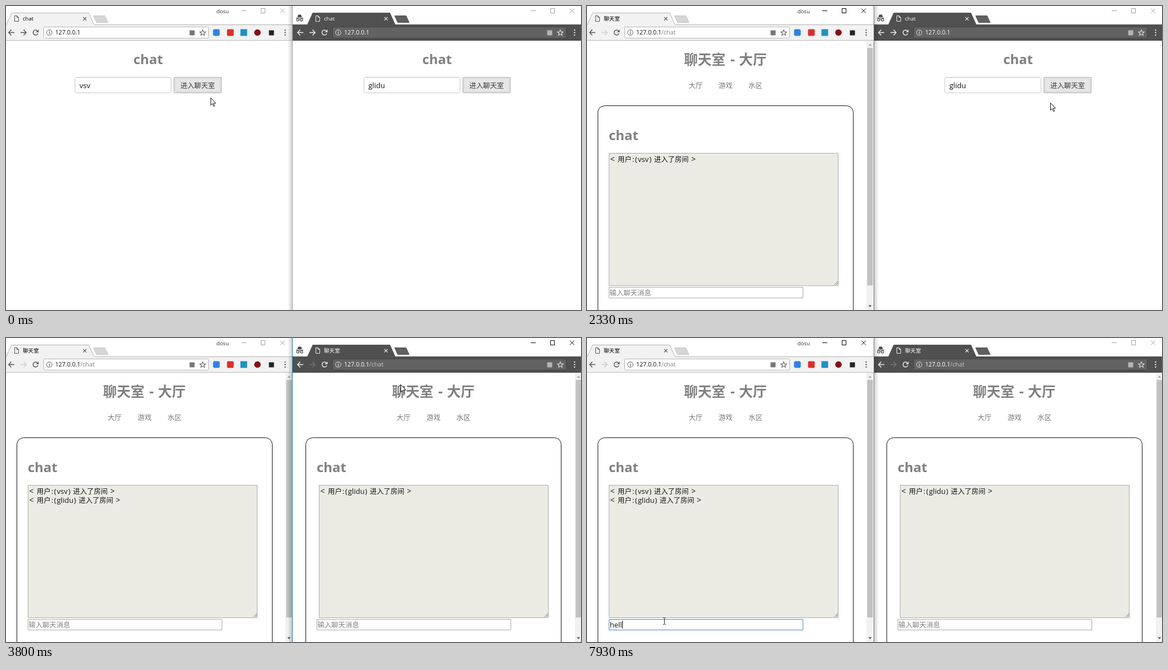
These frames come from a looping animation (1029 px wide and 544 px high, 8 s). An HTML page with a canvas:

```html
<!DOCTYPE html>
<html lang="zh">
<head>
<meta charset="utf-8">
<title>chat</title>
<style>
html, body { margin: 0; width: 100%; height: 100%; overflow: hidden; background: #fff; }
canvas { display: block; }
</style>
</head>
<body>
<canvas id="stage" width="1029" height="544"></canvas>
<script>
const g = document.getElementById('stage').getContext('2d');
const FONT = '"Open Sans", "Noto Sans CJK SC", "Noto Sans CJK", sans-serif';
const LOOP = 8000, SHIFT = 517;
const LEFT_USER = 'vsv', RIGHT_USER = 'glidu';

// Pointer hot spot: time, x, y
const POINTER = [
  [0, 366, 164], [400, 366, 163], [1000, 362, 146], [1200, 359, 141], [1330, 321, 140],
  [1400, 347, 136], [1600, 347, 136], [1900, 560, 158], [2200, 861, 172], [2330, 829, 173],
  [2400, 832, 170], [2600, 848, 152], [2730, 893, 142], [2870, 873, 144], [3530, 873, 144],
  [3700, 800, 98], [3850, 660, 75], [4000, 480, 130], [4200, 230, 360], [4330, 136, 491],
  [4400, 136, 481], [4600, 139, 508], [4800, 139, 508], [4930, 138, 506]
];
// Typing: time, text
const TYPED = [[5870, 'h'], [6070, 'he'], [6470, 'hel'], [6670, 'helo'], [7600, 'hel'], [7930, 'hell']];

const ARROW = new Path2D('M.5 .5V13.5L3.5 10.7L5.7 15.6L7.6 14.8L5.4 10H9.4Z');
const HAND = new Path2D('M-1.5 1.2Q0 -.8 1.5 1.2V6Q3.5 5.2 4.2 6.8Q6 6 6.6 7.6Q9 7.2 9 9.5V13Q8.6 15.5 7.5 17.5H.5Q-1 14.5 -3.8 11.5Q-4.3 9 -1.5 10.5Z');

function rect(x, y, w, h, fill) { g.fillStyle = fill; g.fillRect(x, y, w, h); }

function box(x, y, w, h, r, fill, stroke) {
  g.beginPath();
  g.roundRect(x + .5, y + .5, w - 1, h - 1, r);
  if (fill) { g.fillStyle = fill; g.fill(); }
  if (stroke) { g.strokeStyle = stroke; g.lineWidth = 1; g.stroke(); }
}

function text(s, x, y, size, color, weight = 400) {
  g.font = `${weight} ${size}px ${FONT}`;
  g.fillStyle = color;
  g.fillText(s, x, y);
}

function line(color, width, ...pts) {
  g.beginPath();
  for (let i = 0; i < pts.length; i += 2) g.lineTo(pts[i], pts[i + 1]);
  g.strokeStyle = color; g.lineWidth = width; g.stroke();
}

function poly(fill, stroke, ...pts) {
  g.beginPath();
  for (let i = 0; i < pts.length; i += 2) g.lineTo(pts[i], pts[i + 1]);
  g.closePath();
  g.fillStyle = fill; g.fill();
  if (stroke) { g.strokeStyle = stroke; g.lineWidth = 1; g.stroke(); }
}

function ring(x, y, r, color, width = 1, from = 0, to = 7) {
  g.beginPath(); g.arc(x, y, r, from, to);
  g.strokeStyle = color; g.lineWidth = width; g.stroke();
}

function dot(x, y, r, color) {
  g.beginPath(); g.arc(x, y, r, 0, 7); g.fillStyle = color; g.fill();
}

function cross(x, y, r, color, width) {
  line(color, width, x - r, y - r, x + r, y + r);
  line(color, width, x - r, y + r, x + r, y - r);
}

function star(x, y, color) {
  g.beginPath();
  for (let i = 0; i < 10; i++) {
    const a = i * Math.PI / 5 - Math.PI / 2, r = i % 2 ? 2.4 : 5.4;
    g.lineTo(x + r * Math.cos(a), y + r * Math.sin(a));
  }
  g.closePath(); g.strokeStyle = color; g.lineWidth = 1.1; g.stroke();
}

function navArrow(x, dir, color) {
  line(color, 1.6, x - 5 * dir, 47.5, x + 5 * dir, 47.5);
  line(color, 1.6, x + .5 * dir, 42.5, x + 5.2 * dir, 47.5, x + .5 * dir, 52.5);
}

function reload(x, color) {
  ring(x, 47.5, 4.4, color, 1.6, .4, 5.4);
  poly(color, null, x + 5.4, 42, x + 5.4, 47, x + .5, 47);
}

function tab(x, title, dark, loading) {
  const bg = dark ? '#505050' : '#f2f2f2', ink = dark ? '#eee' : '#555';
  poly(bg, dark ? '#505050' : '#b0b0b0', x + .5, 33.5, x + 10, 12.5, x + 148, 12.5, x + 157.5, 33.5);
  poly(dark ? '#606060' : '#d6d6d6', dark ? '#555' : '#c4c4c4',
    x + 156.5, 17.5, x + 177, 17.5, x + 182.5, 29.5, x + 162, 29.5);
  if (loading) dot(x + 20, 18, .9, ink);
  else {
    line(ink, 1, x + 15.5, 18, x + 15.5, 27.5, x + 22.5, 27.5, x + 22.5, 20.5, x + 19.5, 17.5, x + 15, 17.5);
    line(ink, 1, x + 19.5, 17.5, x + 19.5, 20.5, x + 22.5, 20.5);
  }
  text(title, x + 30, 26, 9.6, dark ? '#fff' : '#000');
  cross(x + 141, 22.7, 2.9, ink, 1.2);
}

function browser({ dark, page, active, loading }) {
  const ink = dark ? '#e6e6e6' : '#5a5a5a', bar = dark ? '#505050' : '#f2f2f2';
  const w = dark ? 512 : 513, off = dark ? 1 : 0, x0 = dark ? -4 : 0;
  rect(x0, 0, w + 4, 544, '#fff');
  rect(x0, 33, w + 4, 29, bar);
  rect(x0, 33, w + 4, 1, dark ? '#505050' : '#b0b0b0');
  rect(x0, 61, w + 4, 1, dark ? '#3c3c3c' : '#b8b8b8');
  tab(dark ? 22 : 0, loading ? '127.0.0.1/chat' : page ? '聊天室' : 'chat', dark, loading);
  if (!dark) rect(1, 33, 157, 1, bar);

  const btn = active ? '#000' : '#a0a0a0';
  line(btn, 1, 421 + off, 8.5, 430 + off, 8.5);
  box(456 + off, 4, 8, 9, 0, null, btn);
  cross(495 + off, 8.5, 4, btn, 1);

  navArrow(10, -1, ink);
  navArrow(31, 1, page ? (dark ? '#737373' : '#d0d0d0') : ink);
  if (loading) cross(53, 47.5, 4.2, ink, 1.5); else reload(53, ink);

  box(67, 37, dark ? 419 : 296, 21, 2, dark ? '#626262' : '#fff', dark ? '#444' : '#b4b4b4');
  ring(77.5, 47.5, 4.8, ink);
  rect(77, 46.5, 1.2, 4, ink); rect(77, 44.3, 1.2, 1.2, ink);
  text('127.0.0.1', 88, 51.3, 10.7, dark ? '#fff' : '#111');
  if (page) text('/chat', 133, 51.3, 10.8, dark ? '#c4c4c4' : '#808080');
  if (!loading) box(dark ? 451 : 328, 43, 10, 10, 1, dark ? '#b5b5b5' : '#777');
  star(dark ? 475 : 352, 48, ink);
  for (const y of [43, 47.5, 52]) dot(499.5 + off, y, 1.2, ink);

  if (dark) {
    rect(2, 21, 13, 1.3, '#444');
    poly('#444', null, 4.5, 20, 6, 15.5, 11, 15.5, 12.5, 20);
    ring(5, 25, 2, '#444', 1.2); ring(12, 25, 2, '#444', 1.2);
    line('#444', 1, 7, 24.5, 10, 24.5);
  } else {
    text('dosu', 376.5, 13, 9.7, '#333');
    box(370, 41, 13, 13, 3, '#2f82e0');
    box(395, 41, 13, 13, 2, '#d9302c');
    box(419, 41, 13, 13, 0, '#1f91c2');
    dot(450, 47.5, 5.8, '#850f16');
    box(470, 43, 10, 10, 0, '#222');
  }
}

function login(user, hover) {
  text('chat', 228, 104, 24, '#808080', 700);
  box(123, 127, 173, 29, 3, '#fff', '#c6c6c6');
  line('#eee', 1, 126, 128.5, 293, 128.5);
  text(user, 131.5, 146.6, 13, '#111');
  box(300, 127, 86, 29, 1, '#e6e6e6');
  if (hover) {
    const shade = g.createLinearGradient(0, 127, 0, 156);
    shade.addColorStop(0, 'rgba(0,0,0,0)');
    shade.addColorStop(.4, 'rgba(0,0,0,.05)');
    shade.addColorStop(1, 'rgba(0,0,0,.11)');
    box(300, 127, 86, 29, 1, shade);
  }
  [.24, .06, .035, .015].forEach((a, i) =>
    box(300 + i, 127 + i, 86 - 2 * i, 29 - 2 * i, 1, null, `rgba(0,0,0,${a})`));
  text('进入聊天室', 312, 146.6, 12.4, '#3a3a3a');
}

function message(user, x, y, gap) {
  const ink = '#111';
  text('<', x, y, 14, ink);
  text('用户', x + 13.5, y, 12.4, ink);
  text(':', x + 39.5, y, 13, ink);
  text('(', x + 44.5, y, 13, ink);
  text(user, x + 49.5, y, 13, ink);
  text(')', x + 50 + gap, y, 13, ink);
  text('进入了房间', x + 58.5 + gap, y, 12.4, ink);
  text('>', x + 125 + gap, y, 14, ink);
}

function room({ dark, loading, users, typed, focus, caret }) {
  if (loading) text('聊天室', 211, 105, 24.8, '#808080', 700);
  else {
    text('聊天室', 173.5, 105, 24.8, '#808080', 700);
    text('-', 256.5, 104, 25, '#808080', 700);
    text('大厅', 272, 105, 24.8, '#808080', 700);
  }
  ['大厅', '游戏', '水区'].forEach((s, i) => text(s, 182 + 53.5 * i, 146.7, 12.5, '#777'));
  box(19, 178, 458, 400, 12, '#fff', '#111');
  text('chat', 39, 240, 24, '#808080', 700);

  const ax = dark ? 43 : 39;
  box(ax, 263, 411, 238, 0, '#ebebe4', '#a9a9a9');
  line('#777', 1, ax + 404, 499, ax + 410, 493);
  line('#777', 1, ax + 407, 499, ax + 410, 496);
  users.forEach(([name, gap], i) => message(name, ax + 2.5, 279 + 16.3 * i, gap));

  box(39, 503, 348, 20, 0, '#fff', focus ? '#4a86cf' : '#a9a9a9');
  if (typed) text(typed, 40.8, 517.6, 13, '#111');
  else text('输入聊天消息', 40.5, 518, 12.4, '#808080');
  if (caret) {
    g.font = `400 13px ${FONT}`;
    rect(Math.round(41 + g.measureText(typed).width), 506, 1, 14, '#000');
  }

  const sx = dark ? 501 : 500;
  rect(sx, 62, 13, 482, '#f1f1f1');
  rect(sx + 1.5, 75, 10, 425, '#c1c1c1');
  poly('#a3a3a3', null, sx + 3.5, 71, sx + 9.5, 71, sx + 6.5, 67.5);
  poly('#505050', null, sx + 3.5, 535.5, sx + 9.5, 535.5, sx + 6.5, 539);
}

function pointerAt(t) {
  const i = POINTER.findIndex(k => k[0] > t);
  if (i < 0) return POINTER.at(-1).slice(1);
  const [a, ax, ay] = POINTER[i - 1], [b, bx, by] = POINTER[i], p = (t - a) / (b - a);
  return [Math.round(ax + (bx - ax) * p), Math.round(ay + (by - ay) * p)];
}

const inside = (x, y, l, t, r, b) => x >= l && x < r && y >= t && y < b;

function drawPointer(x, y, kind) {
  if (kind === 'beam') {
    line('#222', 1, x + .5, y - 5, x + .5, y + 6);
    for (const dy of [-5.5, 6.5]) {
      line('#222', 1, x - 2, y + dy, x, y + dy);
      line('#222', 1, x + 1, y + dy, x + 3, y + dy);
    }
    return;
  }
  const path = kind === 'hand' ? HAND : ARROW;
  g.save();
  g.translate(x, y);
  g.fillStyle = '#fff'; g.fill(path);
  g.strokeStyle = '#111'; g.lineWidth = 1; g.stroke(path);
  if (kind === 'hand') for (const k of [1.5, 4.2, 6.6]) line('#111', .8, k, 7, k, 10);
  g.restore();
}

function edge(leftOnTop, rightActive) {
  const x = leftOnTop ? 514 : 504;
  const shade = g.createLinearGradient(x, 0, x + 8, 0);
  shade.addColorStop(leftOnTop ? 0 : 1, 'rgba(0,0,0,.18)');
  shade.addColorStop(leftOnTop ? 1 : 0, 'rgba(0,0,0,0)');
  rect(x, 0, 8, 544, shade);
  rect(leftOnTop ? 513 : 512, 0, 1, 544, leftOnTop ? '#777' : rightActive ? '#2b7fae' : '#a0a0a0');
}

function draw(t) {
  const leftOn = (t >= 1600 && t < 3130) || t >= 4800;
  const rightOn = t >= 3130 && t < 4800;
  const leftPage = t >= 1670, rightPage = t >= 3200;
  const leftLoading = leftPage && t < 1800, rightLoading = rightPage && t < 3330;

  const [x, y] = pointerAt(t);
  const side = x > 512 ? 1 : 0, lx = x - side * SHIFT;
  const inRoom = side ? rightPage : leftPage;
  const onButton = !inRoom && inside(lx, y, 300, 127, 386, 156);
  const onText = inRoom
    ? inside(lx, y, 39, 264, 450, 501) || inside(lx, y, 39, 503, 387, 523)
    : inside(lx, y, 123, 127, 296, 156);

  const key = TYPED.filter(k => k[0] <= t).at(-1);
  const focus = t >= 4800;
  const since = t - (key ? key[0] : 4800);
  const users = [];
  if (t >= 1800) users.push([LEFT_USER, 20]);
  if (t >= 3330) users.push([RIGHT_USER, 30]);

  browser({ dark: false, page: leftPage, active: leftOn, loading: leftLoading });
  if (leftPage) room({
    loading: leftLoading, users, focus,
    typed: key ? key[1] : '', caret: focus && since % 1065 < 530
  });
  else login(LEFT_USER, onButton && !side);

  g.save();
  g.beginPath(); g.rect(513, 0, 516, 544); g.clip();
  g.translate(SHIFT, 0);
  browser({ dark: true, page: rightPage, active: rightOn, loading: rightLoading });
  if (rightPage) room({ dark: true, loading: rightLoading, users: users.slice(1), typed: '' });
  else login(RIGHT_USER, onButton && side);
  g.restore();

  edge(leftOn, rightOn);
  drawPointer(x, y, onButton ? 'hand' : onText ? 'beam' : 'arrow');
}

function tick() {
  draw(performance.now() % LOOP);
  requestAnimationFrame(tick);
}
tick();
</script>
</body>
</html>
```
